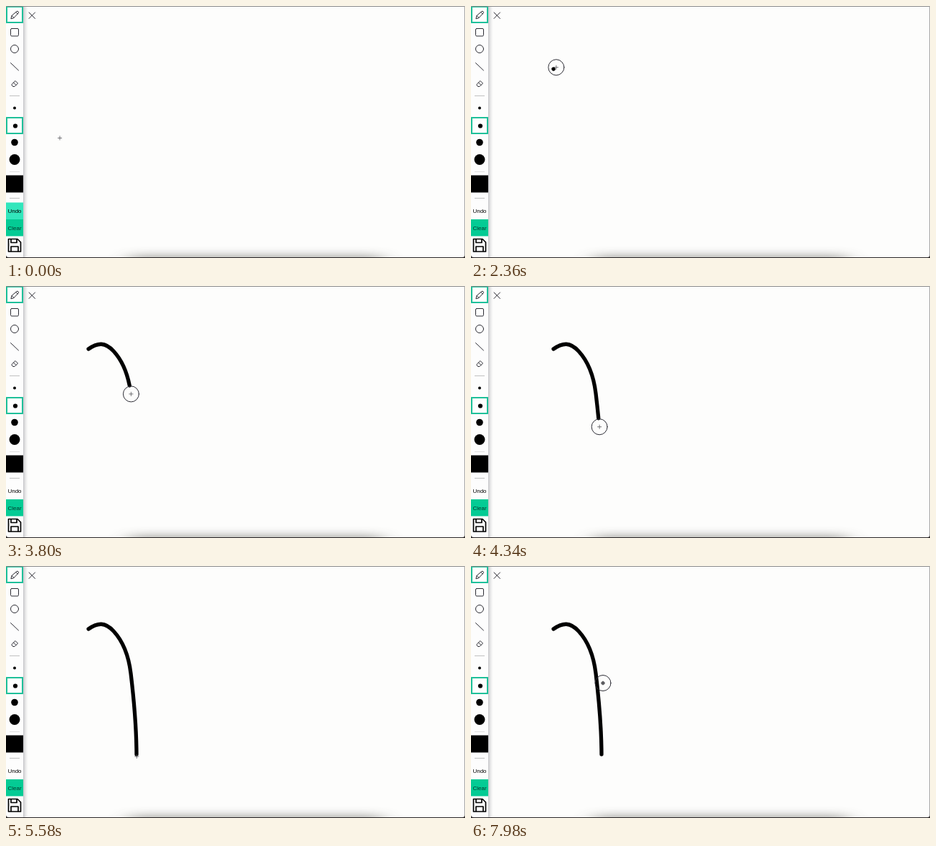
These frames come from a looping animation (640x352 px, 8 s). An HTML page:

```html
<!DOCTYPE html>
<html lang="en">
<head>
<meta charset="utf-8">
<title>Sketch pad</title>
<style>
html, body { margin: 0; width: 100%; height: 100%; overflow: hidden; background: #fdfdfc; }
svg { display: block; width: 100vw; height: 100vh; }
text { font: 8px "Liberation Sans", Arial, sans-serif; text-anchor: middle; }
.line { fill: none; stroke: #2c2c34; stroke-width: 1; stroke-linecap: round; stroke-linejoin: round; }
.active { fill: #fff; stroke: #1fc09a; stroke-width: 2; }
.rule { stroke: #c0c0c0; stroke-width: 1; }
</style>
</head>
<body>
<svg viewBox="0 0 640 352">
  <defs>
    <linearGradient id="edge">
      <stop offset="0" stop-color="#8c8c94" stop-opacity=".5"/>
      <stop offset="1" stop-color="#d0d0d0" stop-opacity="0"/>
    </linearGradient>
    <filter id="soft" x="-20%" y="-200%" width="140%" height="500%">
      <feGaussianBlur stdDeviation="15 7"/>
    </filter>
  </defs>

  <rect width="640" height="352" fill="#fdfdfc"/>
  <rect x="172" y="350" width="352" height="24" fill="#80807a" opacity=".85" filter="url(#soft)"/>
  <rect x="24" width="7" height="351" fill="url(#edge)"/>
  <rect width="24" height="351" fill="#fdfdfd"/>

  <g transform="translate(0 .5)">
    <rect class="active" x="1" y=".5" width="22" height="22"/>
    <path class="line" d="M7 17l1-4 7-6q1-.7 2 .3t.3 2L11 16zM8 13l3 3M13.8 8l2.6 2.6"/>
    <rect class="line" x="6.5" y="31" width="11" height="10.500" rx="1.5"/>
    <circle class="line" cx="12" cy="59.500" r="5.5"/>
    <path class="line" d="M6.5 79L17.5 89.500"/>
    <path class="line" d="M8 109l5-5 3.500 3.500-4.500 4.500h-2zM10.500 106.500l3.500 3.500"/>
    <path class="rule" d="M5 125h14M5 268h14"/>
    <path class="rule" d="M5 231h14" opacity=".5"/>
    <rect class="active" x="1" y="155.500" width="22" height="22"/>
    <g id="sizes"></g>
    <rect y="236" width="24" height="24"/>
    <rect id="undo" y="274" width="24" height="23.500" fill="#32e6bc"/>
    <rect y="297.500" width="24" height="23.500" fill="#04cb94"/>
    <text x="12" y="288.500">Undo</text>
    <text x="12" y="312" fill="#043a2c">Clear</text>
    <path class="line" style="stroke:#000;stroke-width:1.7" d="M3.500 325h12.500l4.500 4.500v13h-17zM7 325v5h8v-5M7 342.500v-7h10v7"/>
  </g>
  <path class="line" d="M32 9l8.500 8.500M40.500 9L32 17.500"/>

  <path id="ink" fill="none" stroke="#000" stroke-width="5.3" stroke-linecap="round"
    d="M115 88C128 79 138 78 150 91S171 125 174 150S182 220 182 266"/>
  <circle id="spot" r="2.500" fill="#66666a"/>
  <g id="cursor">
    <circle id="ring" class="line" r="11"/>
    <path d="M-3 0h6M0-3v6" stroke="#55555a" stroke-width=".8"/>
  </g>

  <path d="M0 .5H640" stroke="#8a8a8a"/>
  <path d="M639.500 0V352" stroke="#a8a8a8"/>
  <path d="M0 347.500q0 3.500 4 3.500H636q4 0 4-3.500V352H0z" fill="#2a2626"/>
</svg>
<script>
const LOOP = 8000, ARRIVE = 1800, PRESS = 2240, STROKE_END = 5480, RELEASE = 5530;
const LEAVE = 6040, RETURN = 7580, PRESS_AGAIN = 7680;
const LAG = 12, TAIL = 3;
const $ = id => document.getElementById(id);
const [sizes, undo, ink, spot, cursor, ring] =
  ['sizes', 'undo', 'ink', 'spot', 'cursor', 'ring'].map($);

// Brush sizes, each about 1.55 times the last
for (let i = 0; i < 4; i++) {
  const chosen = i === 1 ? 1 : 0;
  sizes.innerHTML += `<circle cx="${12 + chosen}" cy="${142 + 24 * i + chosen}" r="${2 * 1.55 ** i}"/>`;
}

const length = ink.getTotalLength();
const progress = (t, from, to) => Math.min(1, Math.max(0, (t - from) / (to - from)));
const mix = (a, b, p) => a + (b - a) * p;
const smooth = p => p * p * (3 - 2 * p);
const easeOut = p => 1 - (1 - p) ** 2;
const show = (el, on) => el.setAttribute('visibility', on ? 'visible' : 'hidden');

// Distance the hand has travelled along the stroke
const travel = t => {
  const p = progress(t, PRESS, STROKE_END);
  return length * mix(p, smooth(p), 0.55);
};

function place(t) {
  if (t < PRESS) {
    const p = easeOut(progress(t, 0, ARRIVE));
    return [mix(75, 115, p), mix(184.5, 88, p)];
  }
  if (t < RELEASE) {
    const { x, y } = ink.getPointAtLength(travel(t));
    return [x + 0.3, y];
  }
  const p = smooth(progress(t, LEAVE, RETURN));
  return [mix(182.3, 184, p), mix(266, 163.5, p)];
}

function draw(t) {
  const [x, y] = place(t);
  const drawing = t >= PRESS && t < RELEASE;
  const pressedAgain = t >= PRESS_AGAIN;
  cursor.setAttribute('transform', `translate(${x} ${y})`);
  show(ring, drawing || pressedAgain);

  const drawn = drawing ? Math.max(0.01, travel(t) - LAG) : length - TAIL;
  ink.setAttribute('stroke-dasharray', `${drawn} 999`);
  show(ink, t >= PRESS);

  spot.setAttribute('cx', x);
  spot.setAttribute('cy', y);
  show(spot, pressedAgain);

  undo.setAttribute('opacity', 1 - progress(t, 0, 300));
}

const start = performance.now();
function tick() {
  draw((performance.now() - start) % LOOP);
  requestAnimationFrame(tick);
}
tick();
</script>
</body>
</html>
```
